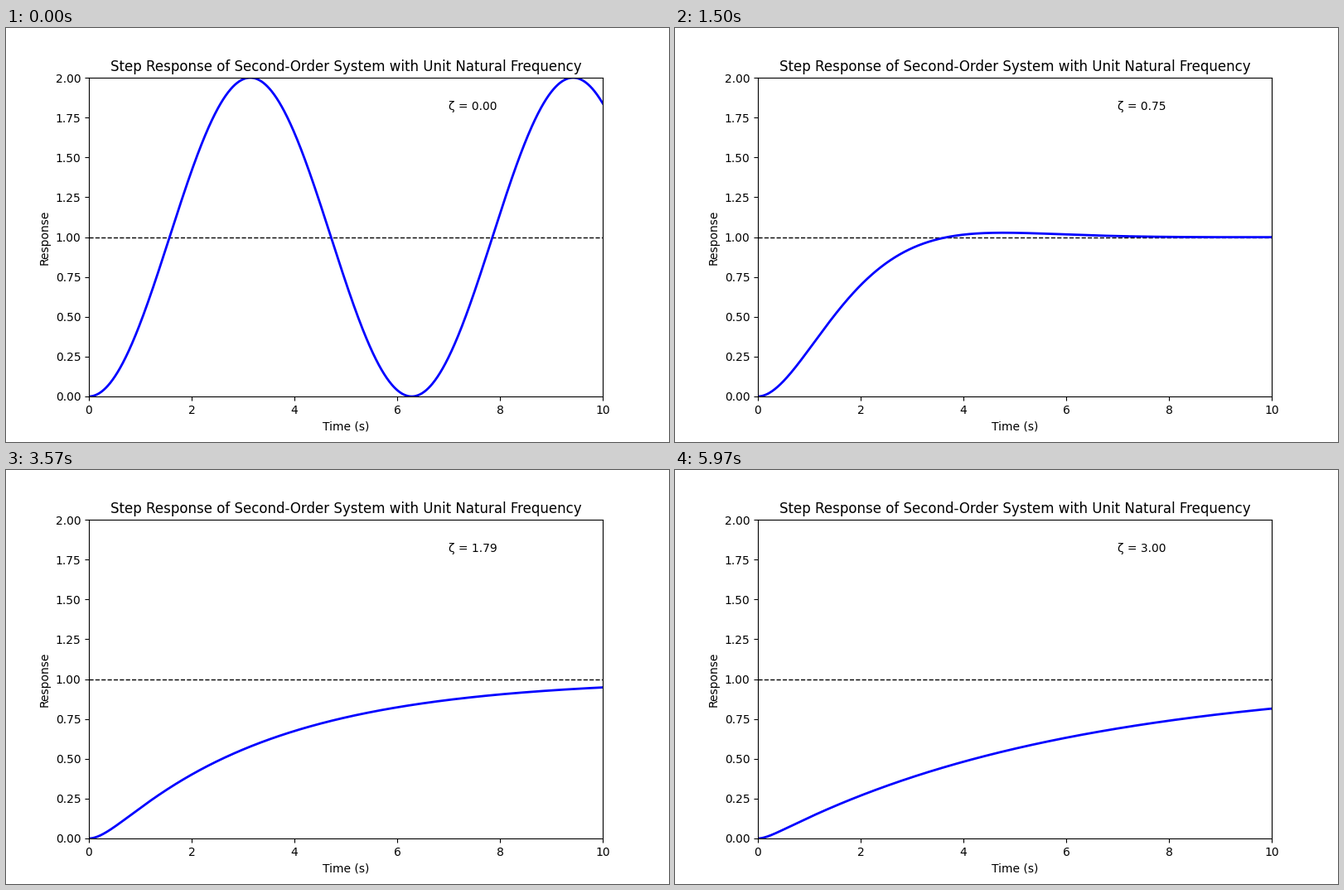
A matplotlib script for the animation above (6000 ms loop, 800 px wide and 500 px high).

```python
import numpy as np
import matplotlib.pyplot as plt
from matplotlib.animation import FuncAnimation

plt.rcParams["font.family"] = "DejaVu Sans"

FRAMES = 200
INTERVAL = 30  # ms

t = np.linspace(0, 10, 1000)
zetas = np.linspace(0, 3, FRAMES)


def step_response(zeta):
    """Unit step response with a natural frequency of 1 rad/s."""
    if np.isclose(zeta, 1):
        return 1 - (1 + t) * np.exp(-t)
    if zeta < 1:
        wd = np.sqrt(1 - zeta**2)
        return 1 - np.exp(-zeta * t) * (np.cos(wd * t) + zeta / wd * np.sin(wd * t))
    root = np.sqrt(zeta**2 - 1)
    s1, s2 = -zeta + root, -zeta - root
    return 1 + (s2 * np.exp(s1 * t) - s1 * np.exp(s2 * t)) / (s1 - s2)


fig, ax = plt.subplots(figsize=(8, 5), dpi=100)
ax.set(
    xlim=(0, 10),
    ylim=(0, 2),
    xlabel="Time (s)",
    ylabel="Response",
    title="Step Response of Second-Order System with Unit Natural Frequency",
)
ax.axhline(1, color="black", linestyle="--", linewidth=1)
curve, = ax.plot([], [], color="blue", linewidth=2)
label = ax.text(7, 1.8, "")


def update(i):
    curve.set_data(t, step_response(zetas[i]))
    label.set_text(f"ζ = {zetas[i]:.2f}")
    return curve, label


anim = FuncAnimation(fig, update, frames=FRAMES, interval=INTERVAL, repeat=True)

plt.show()
```
